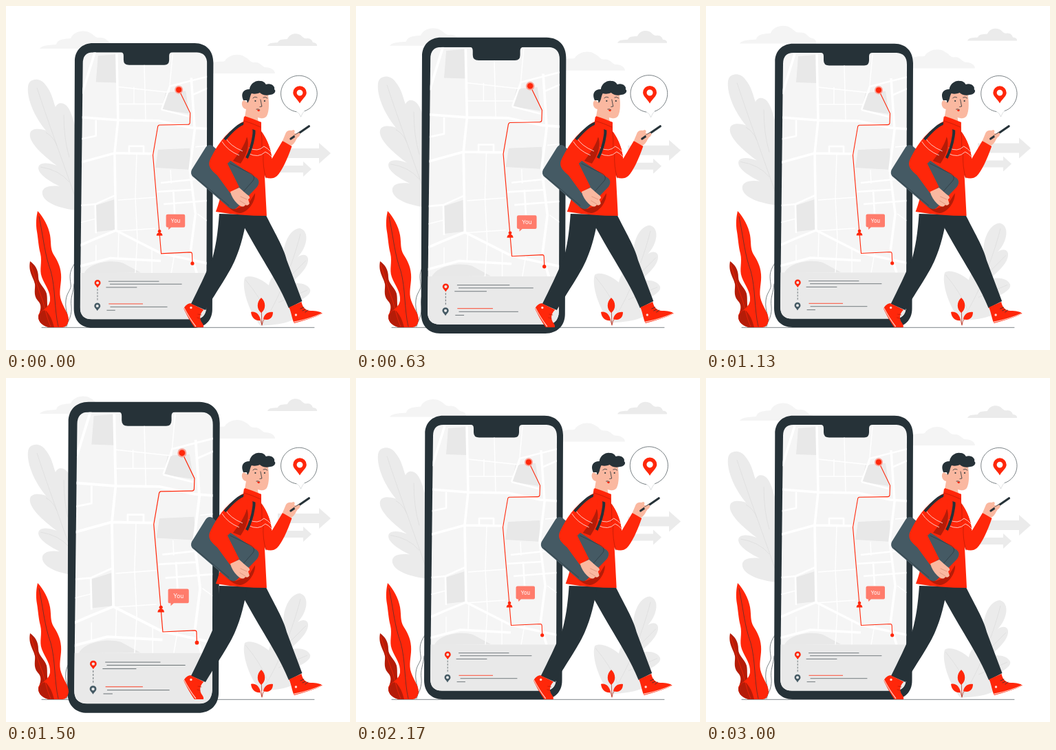
Recreate the animation shown at these times as an HTML page. Size 500 px wide and 500 px high, loop 3.04 s.

```html
<!DOCTYPE html>
<html lang="en">
<head>
<meta charset="utf-8">
<title>Map app walk</title>
<style>
html, body { margin: 0; height: 100%; overflow: hidden; background: #fff; }
svg { display: block; width: 100vw; height: 100vh; }
.ln { fill: none; stroke: #263238; stroke-width: .8; stroke-linecap: round; stroke-linejoin: round; }
.thin { stroke-width: .6; }
.seam { stroke: #b51c08; stroke-width: .7; }
.strap { fill: none; stroke: #263238; stroke-width: 4; }
.ink { fill: #263238; }
.red { fill: #ff270a; }
.deep { fill: #b51c08; }
.skin { fill: #fab8a0; }
.bag { fill: #455a64; }
.pale { fill: #ebebeb; }
.mist { fill: #f4f4f4; }
.rib { fill: none; stroke: #dedede; stroke-width: .8; }
.road { fill: none; stroke: #fff; stroke-linejoin: round; }
.trim { fill: none; stroke: #ffd9d2; stroke-width: .9; }
</style>
</head>
<body>
<svg viewBox="0 0 500 500">
<defs>
  <clipPath id="screen">
    <path d="M112 84Q112 68 127 68H167Q171 68 171 73V79Q171 86.500 179 86.500H230Q237 86.500 237 79V73Q237 68 242 68H277Q292 69 292 85L291 437Q290 454.500 274 454.500H125Q108 454.500 108 437Z"/>
  </clipPath>
  <path id="pin" fill-rule="evenodd" d="M0 15C-3 9-9.700 5-9.700-.500A9.700 9.700 0 0 1 9.700-.500C9.700 5 3 9 0 15ZM0-4.800A4.400 4.400 0 1 0 0 4A4.400 4.400 0 1 0 0-4.800Z"/>
</defs>

<g id="back">
  <path class="mist" d="M49 62C53 56 66 57 73 56C75 47 88 48 94 47C98 37 114 33 124 40C130 44 131 47 137 46C147 46 148 53 153 54C159 55 161 59 160 62Z"/>
  <path class="mist" d="M300 98V83C309 79 313 82 318 80C323 71 339 68 347 74C354 77 354 82 361 82C368 81 371 87 376 89C385 89 391 93 391 98Z"/>
  <path class="pale" d="M380 58C383 52 391 54 395 53C398 47 405 49 409 48C412 40 423 38 429 43C432 46 434 48 438 47C443 47 445 50 446 53C450 53 453 56 452 58Z"/>
  <g transform="translate(0 -2)">
    <path class="pale" d="M32 119C33 107 49 105 57 116C67 128 68 139 72 149C75 141 84 142 89 148C96 157 98 170 102 181V299C86 297 57 291 53 276C51 266 61 262 78 264C59 255 43 243 48 234C53 228 65 231 74 234C53 219 32 199 35 187C37 179 49 180 58 183C42 164 30 137 32 119Z"/>
    <path class="rib" d="M45 121C62 173 84 232 102 284M58 186Q69 192 74 205M84 160Q84 195 92 222M50 236Q77 240 92 258"/>
  </g>
  <path class="pale" d="M370 465C353 445 342 410 347 395C354 390 369 395 382 406C385 390 398 384 406 377C398 355 410 324 427 323C442 327 438 350 424 365C432 359 440 362 439 370C438 383 422 395 410 407C420 400 438 403 442 412C445 422 421 430 410 438C425 437 429 442 426 449C414 463 388 463 370 465Z"/>
  <path class="rib" d="M372 464C395 430 417 375 428 331M348 398Q370 424 380 449M436 370L404 402M438 413L396 431"/>
  <path class="pale" d="M395 207H455V199L472 214L455 229V221H395ZM395 232H432V226L444 237L432 248V242H395Z"/>
</g>

<path class="ln thin" d="M52 467.300H448"/>
<path class="ln thin" d="M100 374C91 387 93 394 94 404C96 412 88 416 87 428C85 445 94 452 88 466M99 404C98 417 93 424 95 437C96 447 92 458 86 466"/>

<g id="phone">
  <path class="ink" d="M127 54.700H274C291 55 301 66 301 83L299.500 440C299.500 456 289 467 272 467H126C109 467 99 456 99 439L100.300 81C100.300 65 111 54.700 127 54.700Z"/>
  <g clip-path="url(#screen)">
    <path fill="#f5f5f5" d="M105 65H295V458H105Z"/>
    <path fill="#e8e8e8" d="M134 73L160 71L161 112L131 111ZM232 126L261 124L266 157L226 151ZM221 209L267 207L269 238L217 235ZM130 290L158 281L159 325L131 328ZM114 388C120 374 150 367 170 373L196 387Z"/>
    <g class="road" stroke-width="3.500">
      <path d="M130 66L111 128M110 162L162 166L221 167L268 177L294 179M161 70L163 166L158 214L160 326L130 338L107 348M107 228L158 214L215 215M160 326L225 359L294 374M107 378L152 366L225 370M269 105L274 180L267 237L275 302L268 357L277 388"/>
      <path stroke-width="2.500" d="M107 290L130 288L159 275M130 288L131 330M107 194L131 189V166M179 214V204H200V214M225 257L292 250M219 270L270 267M243 267L245 302M229 288L292 283M268 237L293 233M270 130L293 120M226 151L238 117L293 103M226 151L266 161"/>
      <path stroke-width="1.400" d="M163 118L237 126M163 143H228M186 118V143M201 86L203 166M242 70L237 126M160 327L217 323M163 282L217 278M190 215L188 278M188 278L191 338M191 338L188 388M164 329L163 366M212 352V388M245 359L240 388M131 347V372M107 315L131 309M239 238L240 258M275 205L294 203M278 302L292 312"/>
    </g>
    <path fill="#e9e9e9" d="M105 387.500H295V458H105Z"/>
  </g>
  <path fill="none" stroke="#ff270a" stroke-width="1.100" d="M251 122L267.500 156L267 170Q267 172.500 264 172.600L223 173.300Q221 173.400 220.500 176L213.500 217L225.500 359.500L268 357.500Q270 357.500 270.200 360L270.700 373"/>
  <circle cx="251" cy="122.300" r="6" fill="#f9a297"/>
  <circle cx="251" cy="122.300" r="4.100" class="red"/>
  <circle cx="270.700" cy="373.800" r="2.600" class="red"/>
  <circle cx="223" cy="327" r="2.300" class="red"/>
  <path class="red" d="M218.600 333.500Q219 329 223 329T227.400 333.500Z"/>
  <path fill="#ff7c6c" d="M235 302.500H258Q260 302.500 260 304.500V319.500Q260 321.500 258 321.500H240L236 325V321.500H235Q232.500 321.500 232.500 319.500V304.500Q232.500 302.500 235 302.500Z"/>
  <text x="246.300" y="314.800" text-anchor="middle" fill="#fff" font-size="7.600" font-family="Inter, Open Sans, sans-serif">You</text>
  <use href="#pin" class="red" transform="translate(133.300 402.200) scale(.46)"/>
  <use href="#pin" class="bag" transform="translate(133 435.500) scale(.46)"/>
  <path class="ln thin" stroke-dasharray="2 2.500" d="M133.200 411V429"/>
  <path class="ln thin" d="M149.500 399.700H222M151.500 403.700H255M146 408.400H190M152 436.700H234M147 441.600H158.500"/>
  <path fill="none" stroke="#ff270a" stroke-width=".8" d="M149.500 432.300H199"/>
</g>

<path class="deep" d="M35 371C42 376 47 383 47 394C47 404 56 408 59 418C61 427 58 435 63 444L72 467H62C50 464 45 456 48 448C51 440 52 434 46 428C39 420 43 410 42 404C40 394 32 387 35 371Z"/>
<path class="red" d="M46 298C54 306 62 321 64 333C66 345 64 352 69 361C74 369 79 377 80 390C81 402 77 412 79 424C82 437 91 446 91 456C90 463 87 467 82 467H62C53 464 46 458 47 450C49 442 62 441 64 428C65 415 57 407 52 394C48 383 53 372 50 360C47 348 47 340 45 328C43 316 44 307 46 298Z"/>
<path class="deep" d="M47 451C51 442 57 440 60 445C66 452 68 460 70 467H62C53 464 47 459 47 451Z"/>
<path class="ln thin" d="M48 306C55 340 56 360 65 385C72 410 70 440 76 466"/>
<path fill="none" stroke="#ff270a" stroke-width=".7" d="M36 376C43 398 48 415 53 427C58 445 60 455 65 466"/>

<path class="ln seam" d="M371 435L372 464M360 448Q370 453 372 463M383 448Q374 453 372 463"/>
<path class="red" d="M371 424C378 430 378 441 371 446C364 441 364 430 371 424ZM356 445C363 443 369 449 370 457C362 458 357 453 356 445ZM388 445C388 453 383 458 374 455C375 448 381 444 388 445Z"/>

<g id="man">
  <path class="ink" d="M346 302H377C389 327 404 351 408 369L430.500 429L411 439C399 410 386 390 375 371C364 353 354 335 345 319Z"/>
  <path class="ink" d="M310 302C308 330 305 350 300 367C291 388 279 413 269 433L290 442C307 414 326 386 333 369C342 348 346 330 351 303Z"/>
  <path class="red" d="M268 432L287.500 441.500C282 447 281 453 284 459Q288 464 287 467H274C269 460 262 448 258.500 440C260 436 263 433 268 432Z"/>
  <path fill="none" stroke="#ffc8be" stroke-width="1.300" d="M259 439C264 449 270 458 276 466"/>
  <circle cx="269" cy="438.500" r="1.700" fill="#ffd9d2"/>
  <path class="ln seam" d="M279 448L284 449M278 453L282 454"/>
  <path class="red" d="M411.500 438L429.500 430C431 438 436 443 443 443C451 443 457 444 460 447C448 453 434 457 419 461C416 456 415 446 411.500 438Z"/>
  <path fill="none" stroke="#ffc8be" stroke-width="1.300" d="M418.500 459.500C435 456 448 452 459 447"/>
  <circle cx="421.500" cy="449" r="1.700" fill="#ffd9d2"/>
  <path class="ln" d="M428 440L433 438M431 443L435 441M435 445L439 442"/>

  <path class="red" d="M346 161L371 169L371 182C380 194 386 209 386 222L376 247L379 305Q341 305 305 299C313 278 316 259 317 237L323 197C328 180 337 171 345 168Z"/>
  <path class="deep" d="M350 190C354 198 352 214 341 229L330 225C340 212 347 202 350 190ZM322 291L334 295L352 288L362 272C363 284 352 300 340 301Q330 300 322 291Z"/>
  <path class="red" d="M372 183C380 195 385 207 386.500 222L402 196Q409 198 415.500 204C409 223 401 240 394 247Q387 253 377 249Q372 230 372 183Z"/>
  <path class="ln seam" d="M374 215Q373 234 378 250M370 175Q373 192 372 209"/>
  <path class="bag" d="M300 203Q294 200 290 206L270 238Q267 245 273 249L323 292Q330 298 336 293L365 263Q371 254 363 249L322 222Z"/>
  <path class="ln thin" d="M326 229L357 244Q363 249 359 254L336 280M273 247L324 290"/>
  <path class="trim" d="M353 206Q366 213 375 204Q381 207 385 212M352 214Q367 222 377 212Q382 214 386 219"/>
  <path class="red" d="M343 171C322 181 307 201 296 225C293 234 300 240 307 246L326 272L339 263L322 229C335 217 347 203 350 190C353 181 350 172 343 171Z"/>
  <path class="trim" d="M319 191Q325 203 344 211M314 197Q322 210 339 217"/>
  <path class="strap" d="M318 194C329 181 339 171 350 169.500C359 169 362 178 360 189C358 203 355 211 350 221"/>
  <path class="skin" d="M326 270L339 264C344 268 349 273 353 276Q356 279 352 281L354 287Q352 291 348 289C345 294 340 291 336 287C331 282 328 277 326 270Z"/>
  <path class="ln" style="stroke:#d98870;stroke-width:.7" d="M341 277L350 281M340 283L348 288"/>

  <path class="skin" d="M352 124H380C383 138 383 153 379 160C375 165 370 163 366 162L367 169L347 162L349 150C342 149 341 138 346 137L351 140Z"/>
  <path class="red" d="M347 160Q357 163 371 169L371 183C360 180 351 177 345 173Z"/>
  <path class="ln seam" d="M346 167Q357 170 370 176"/>
  <path class="ink" d="M345 137C341 128 344 121 354 121C355 113 363 108 369 109C374 109 376 111 378 114C385 111 392 117 390 121C394 124 389 129 384 129C378 131 372 129 369 126C365 128 360 128 357 127C354 132 355 137 351 141L350 137Z"/>
  <path class="ln" d="M359 134Q361 131 365 133M374 133Q377 131 380 134M370 136L372 146L369 146.500M364 150Q367 149 369 151"/>
  <path class="red" d="M365 151Q368 149.500 369 152Q367 155 365 151Z"/>
  <circle cx="362.500" cy="138" r="1.100" class="ink"/>
  <circle cx="376" cy="138" r="1.100" class="ink"/>

  <path class="skin" d="M402 196L407 184Q410 180 415 181L420 185L426 186Q428 189 424 191L422 194Q419 201 414 203Z"/>
  <path class="ln" style="stroke-width:3.200" d="M414 193L440.500 174.800"/>
  <path class="skin" d="M409 183L418 180Q421 181 419 184L413 187ZM419 188L426 184Q429 186 427 188L421 192Z"/>
</g>

<g id="bubble">
  <path class="ln thin" style="fill:#fff" d="M422 153.500A26.200 26.200 0 1 1 434 152.500"/>
  <path fill="#fff" stroke="#c6cacc" stroke-width=".6" d="M422 153.500C426 155 427 158 428.500 161C430 158 431 155 434 152.500"/>
  <use href="#pin" class="red" x="427" y="126.500"/>
</g>
</svg>
<script>
const part = id => document.getElementById(id);
const move = (id, value) => part(id).setAttribute('transform', value);
const zoom = (id, x, y, s) => move(id, `translate(${x} ${y}) scale(${s}) translate(${-x} ${-y})`);

// Linear interpolation over [progress, value] keys
function tween(keys, u) {
  const i = Math.max(1, keys.findIndex(k => k[0] >= u));
  const [a, from] = keys[i - 1], [b, to] = keys[i];
  return from + (to - from) * (u - a) / (b - a);
}

const beat = [[0, 1], [.1, 1.1], [.3, 1], [.4, 1], [.5, 1.1], [.6, 1], [1, 1]];
const shake = [0, -1, 2, -4, 4, -4, 4, -4, 2, -1, 0].map((x, i) => [i / 10, x]);
const rise = [[0, 0], [.5, -10], [1, 0]];

function draw(now) {
  const t = Math.min(now % 3040 + 10, 3000);
  const slow = t / 3000, fast = t % 1500 / 1500;
  zoom('phone', 200.3, 261, tween(beat, slow));
  zoom('bubble', 426, 131, tween(beat, fast));
  move('man', `translate(${tween(shake, fast)} 0)`);
  move('back', `translate(0 ${tween(rise, slow)})`);
}

const start = performance.now();
function loop() {
  draw(performance.now() - start);
  requestAnimationFrame(loop);
}
loop();
</script>
</body>
</html>
```
